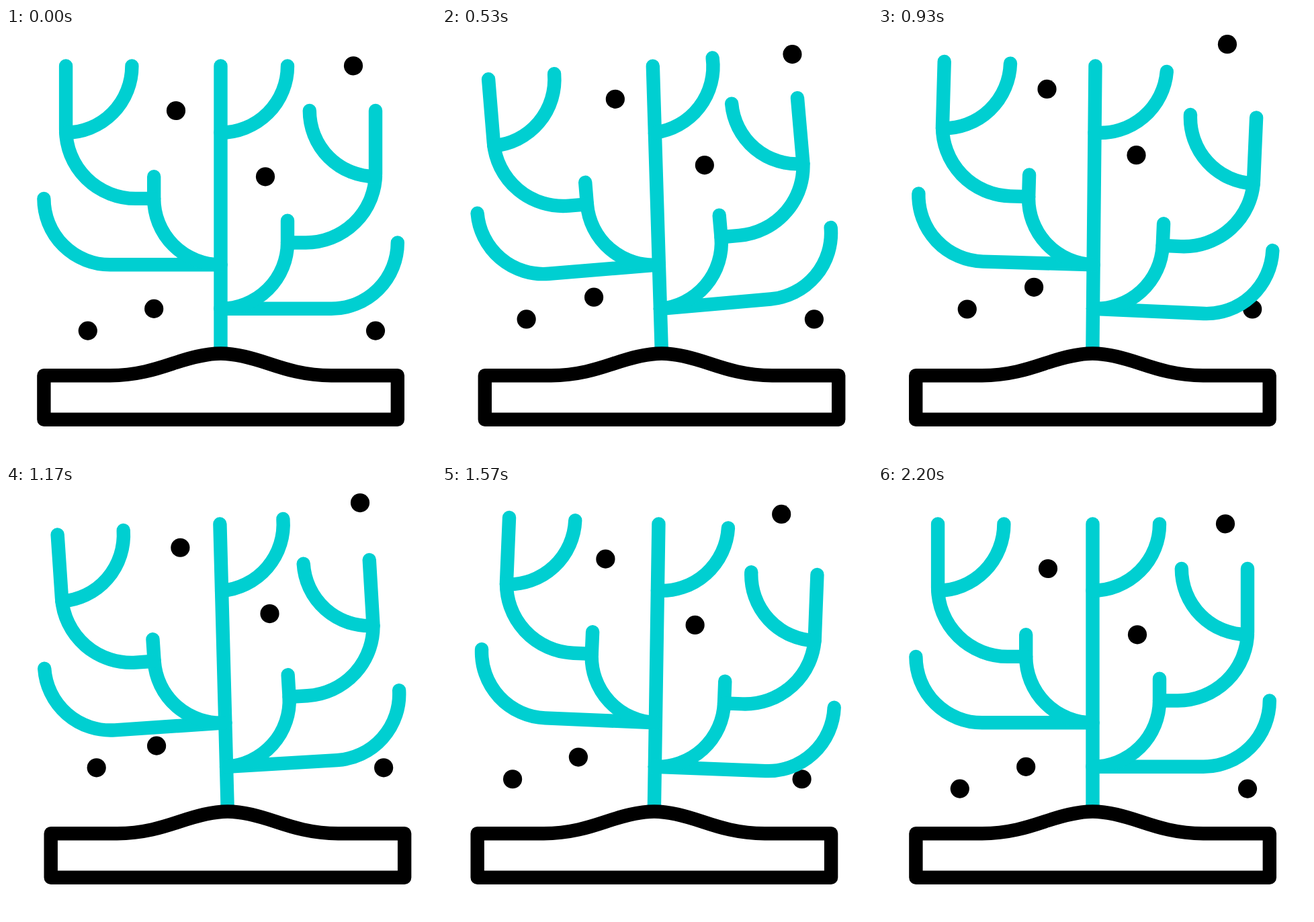
These frames come from a looping animation (640 px wide and 640 px high, 2470 ms). An HTML page:

```html
<!DOCTYPE html>
<html lang="en">
<head>
<meta charset="utf-8">
<title>Swaying winter tree</title>
<style>
  html, body { margin: 0; width: 100%; height: 100%; overflow: hidden; background: #fff; }
  svg { display: block; width: 100%; height: 100%; }
  path { fill: none; stroke-width: 20.4; stroke-linejoin: round; }
  .ground { stroke: #000; }
  .tree path { stroke: #00cfd1; stroke-linecap: round; }

  /* --a to --e are the successive swing peaks, --lag a delay in ticks of 1/30 s */
  .sway, .swing {
    --d: 0; --e: 0; --lag: 0;
    animation: sway 2470ms cubic-bezier(.3333, 0, .6667, 1) calc(var(--lag) * 33.33ms) infinite;
  }
  .swing { animation-name: swing; }
  .rise { animation: rise 2470ms cubic-bezier(.3333, 0, .6667, 1) infinite; }

  @keyframes sway {
    0%, 83.67%, 100% { translate: 0px; }
    16.19% { translate: calc(var(--a) * 1px); }
    29.69% { translate: calc(var(--b) * 1px); }
    43.18% { translate: calc(var(--c) * 1px); }
    56.68% { translate: calc(var(--d) * 1px); }
    70.17% { translate: calc(var(--e) * 1px); }
  }
  @keyframes swing {
    0%, 83.67%, 100% { rotate: 0deg; }
    16.19% { rotate: calc(var(--a) * 1deg); }
    29.69% { rotate: calc(var(--b) * 1deg); }
    43.18% { rotate: calc(var(--c) * 1deg); }
    56.68% { rotate: calc(var(--d) * 1deg); }
    70.17% { rotate: calc(var(--e) * 1deg); }
  }
  @keyframes rise {
    0%, 81.9%, 100% { translate: 0px 0px; }
    41.83% { translate: 0px -33px; }
  }

  #base  { --a: 26; --b: -28.3; --c: 15.8; --d: -7.7; }
  #trunk { --a: -3; --b: 3; --c: -2; --d: 2; --e: -1; --lag: 1; transform-origin: 319.5px 484px; }
  #left  { --a: -5; --b: 5; --c: -3; --d: 3; --e: -1; --lag: 1; transform-origin: 319.5px 352.3px; }
  #right { --a: -4; --b: 4; --c: -2; --d: 2; --e: -1; --lag: 2; transform-origin: 319.5px 417.8px; }
  #twig  { --a: -6; --b: 6; --c: -3; --d: 3; --e: -2; --lag: 3; transform-origin: 319.5px 155.7px; }
</style>
</head>
<body>
<svg viewBox="0 0 640 640">
  <g class="rise">
    <circle class="sway" cx="517" cy="56.3" r="14.1" style="--a:21.3;--b:-28;--c:20.5;--d:-24.6"/>
    <circle class="sway" cx="253" cy="123" r="14.1" style="--a:22.7;--b:-29.5;--c:14.4;--d:-20"/>
    <circle class="sway" cx="386" cy="221.3" r="14.1" style="--a:22.7;--b:-29.5;--c:14.4;--d:-19.5"/>
    <circle class="sway" cx="220.2" cy="417.9" r="14.1" style="--a:6.5;--b:4.7;--c:16;--d:-36"/>
    <circle class="sway" cx="121.8" cy="450.6" r="14.1" style="--a:15.2;--b:-18;--c:27.4;--d:-34.8"/>
    <circle class="sway" cx="550" cy="450.6" r="14.1" style="--a:18.4;--b:-24;--c:24.9;--d:-30"/>
  </g>
  <g id="base" class="sway">
    <g id="trunk" class="swing tree">
      <path d="M319.5 56.4V482"/>
      <g id="left" class="swing">
        <path d="M319.5 352.3H155A98.5 98.5 0 0 1 56.4 253.9"/>
        <path d="M319.5 352.3A99.2 98.5 0 0 1 220.2 253.9V221.2"/>
        <path d="M220.2 253.9H193A104 103 0 0 1 89.1 151V56.4"/>
        <path d="M89.1 155.7A98.4 99.3 0 0 0 187.4 56.4"/>
      </g>
      <g id="right" class="swing">
        <path d="M319.5 417.8H484.4A98.5 98.5 0 0 0 582.8 319.5"/>
        <path d="M319.5 417.8A99.5 98.5 0 0 0 419 319.5V286.7"/>
        <path d="M419 319.5H446A104 103 0 0 0 550 216.5V123"/>
        <path d="M550 221.2A98.2 98.2 0 0 1 451.8 123"/>
      </g>
      <g id="twig" class="swing">
        <path d="M319.5 155.7A99.5 99.3 0 0 0 419 56.4"/>
      </g>
    </g>
    <path class="ground" d="M56.4 517.2H155C194 517.2 224 507.5 248 499.5C272 491.5 296 484.5 319.5 484.5S367 491.5 391 499.5C415 507.5 445 517.2 484 517.2H582.8V582.7H56.4Z"/>
  </g>
</svg>
</body>
</html>
```
